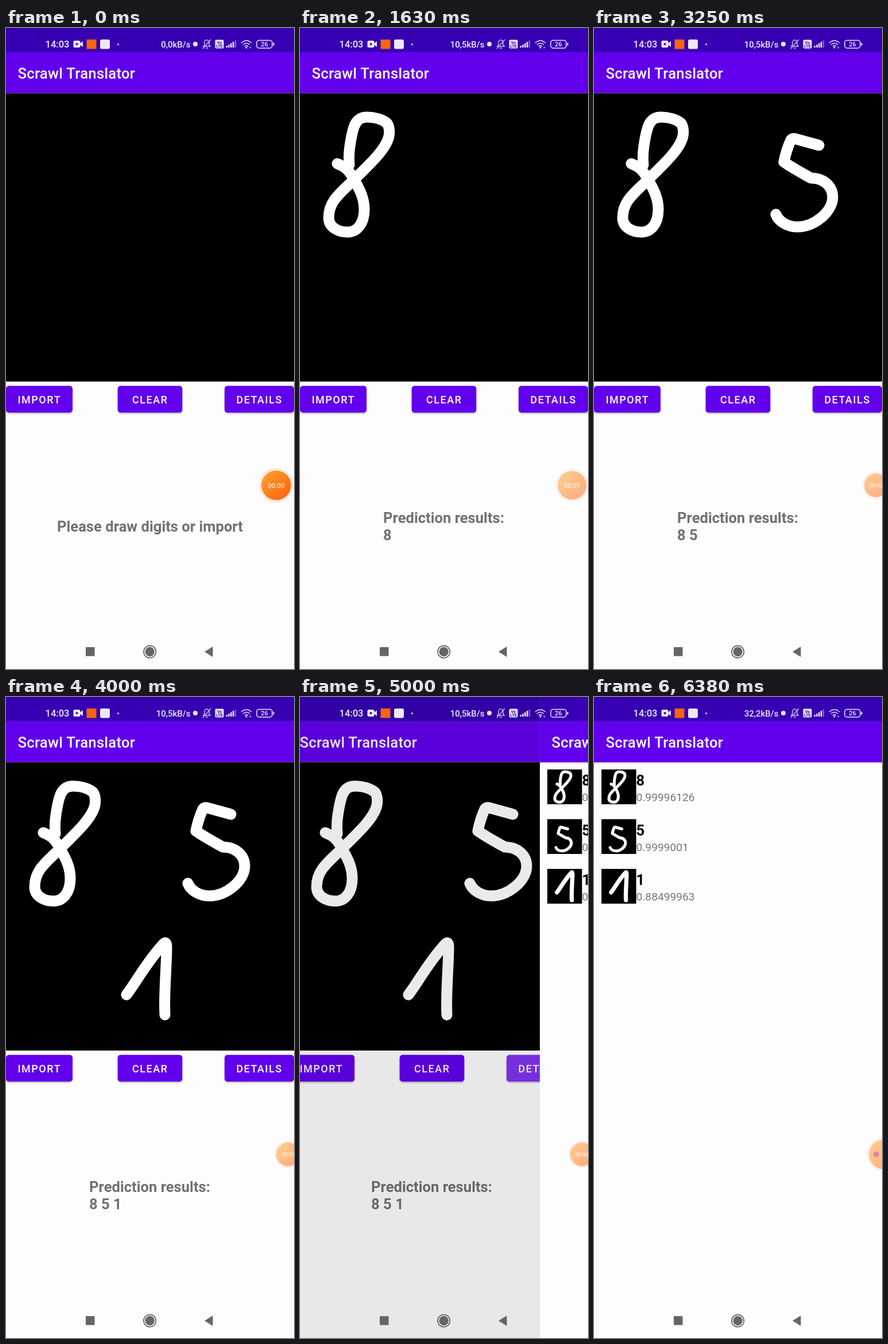
Recreate the animation shown at these times as an HTML page. Size 502 by 1115 pixels, loop 6870 ms.

```html
<!DOCTYPE html>
<html lang="en">
<head>
<meta charset="utf-8">
<title>Scrawl Translator</title>
<style>
  html, body { margin: 0; height: 100%; overflow: hidden; background: #fefdfe; }
  svg { display: block; width: 100vw; height: 100vh; font-family: Roboto, sans-serif; }
  .title { font-size: 25.6px; font-weight: 500; letter-spacing: .32px; fill: #fff; }
  .button { fill: #6200ee; filter: drop-shadow(0 2px 1.5px #0004); }
  .label { font-size: 17.9px; font-weight: 500; letter-spacing: 1.6px; fill: #fff; }
  .message { font-size: 25.6px; font-weight: 700; fill: #727172; }
  .digit { font-size: 25.6px; font-weight: 700; }
  .score { font-size: 19.2px; fill: #777; }
  .ink { fill: none; stroke: #fff; stroke-width: 19; stroke-linecap: round; stroke-linejoin: round; }
  .status { fill: #eee8fa; font-weight: 500; }
  .line { fill: none; stroke: #eee8fa; stroke-width: 1.5; }
</style>
</head>
<body>
<svg viewBox="0 0 502 1115">
  <defs>
    <path id="eight" pathLength="1" d="M65 236C73 240 82 240 95 265C106 284 112 298 112 316C112 342 98 355 83 355C67 355 50 347 50 330C50 300 72 286 95 263C118 240 150 212 155 188C157 176 154 168 151 165C142 158 128 155 117 155C96 155 92 172 87 205C85 218 85 228 86 238"/>
    <path id="five" pathLength="1" d="M392 204L352 193Q346 191 343 195C339 204 334 218 331 233C345 243 362 252 378 261C400 261 416 275 416 294C416 320 384 346 354 346C338 346 322 337 317 324"/>
    <path id="one" pathLength="1" d="M210 518C228 494 246 460 274 430Q280 424 280 434C280 470 275 515 277 553"/>
    <g id="bars">
      <rect width="502" height="42" fill="#3700b3"/>
      <rect y="42" width="502" height="71.5" fill="#6200ee"/>
      <text class="title" x="20.4" y="88">Scrawl Translator</text>
    </g>
    <linearGradient id="orange" x2="1" y2="1">
      <stop offset=".1" stop-color="#ff9d28"/>
      <stop offset=".9" stop-color="#ff650f"/>
    </linearGradient>
    <linearGradient id="shade" x2="0" y2="1">
      <stop stop-color="#000" stop-opacity=".2"/>
      <stop offset="1" stop-opacity="0"/>
    </linearGradient>
    <clipPath id="detailsClip"><rect x="381" y="622.5" width="121" height="46.5" rx="5"/></clipPath>
  </defs>

  <g id="drawPage">
    <rect width="502" height="1115" fill="#fefdfe"/>
    <use href="#bars"/>
    <rect y="113.5" width="502" height="501.5"/>
    <g class="ink" id="ink">
      <use href="#eight"/><use href="#five"/><use href="#one"/>
    </g>
    <rect class="button" y="622.5" width="116" height="46.5" rx="5"/>
    <rect class="button" x="194.7" y="622.5" width="112.6" height="46.5" rx="5"/>
    <rect class="button" id="details" x="381" y="622.5" width="121" height="46.5" rx="5"/>
    <circle id="ripple" cx="455" cy="647" fill="#fff" opacity=".2" clip-path="url(#detailsClip)"/>
    <text class="label" x="20.4" y="653">IMPORT</text>
    <text class="label" x="220" y="653">CLEAR</text>
    <text class="label" x="401.5" y="653">DETAILS</text>
    <text class="message" id="prompt" x="251" y="876" text-anchor="middle">Please draw digits or import</text>
    <g class="message" id="results">
      <text x="145" y="861">Prediction results:</text>
      <text id="found" x="145" y="890.5"></text>
    </g>
  </g>
  <rect id="dim" width="502" height="1115"/>

  <g id="listPage">
    <rect width="502" height="1115" fill="#fefdfe"/>
    <rect y="113" width="502" height="4" fill="url(#shade)"/>
    <use href="#bars"/>
    <g id="rows"></g>
  </g>

  <g class="status">
    <text x="68.5" y="34" font-size="16.5">14:03</text>
    <rect x="117.5" y="22" width="12" height="12" rx="2.5"/>
    <path d="M129 27l5-4v10l-5-4z"/>
    <circle cx="123.5" cy="28" r="2" fill="#3700b3"/>
    <rect x="140.5" y="20" width="17" height="16.5" fill="#f7640a"/>
    <rect x="164" y="20" width="17" height="16.5" rx="3"/>
    <circle cx="195.5" cy="28.5" r="1.5"/>
    <text id="speed" x="321.5" y="33.5" font-size="15" text-anchor="end"></text>
    <circle cx="330" cy="28" r="4"/>
    <g class="line" opacity=".8">
      <path d="M344 32h12l-2-3v-4a4 4 0 0 0-8 0v4zM348 35h4M343 36l14-16"/>
    </g>
    <rect x="364.5" y="20.5" width="15" height="15" rx="2"/>
    <g fill="#3700b3" font-size="7" font-weight="700" text-anchor="middle">
      <text x="372" y="27.5">Vo</text><text x="372" y="34.3">LTE</text>
    </g>
    <path d="M383.5 34v-3h2.5v3zM387.3 34v-5h2.5v5zM391.1 34v-7.500h2.500v7.500zM394.900 34v-10h2.500v10z"/>
    <path d="M398.700 34v-12.500h2.500v12.500z" opacity=".4"/>
    <path class="line" stroke-width="2" d="M410 26q9-8 18 0M413 29q6-5 12 0M416 32q3-2.500 6 0"/>
    <circle cx="419" cy="34" r="1.500"/>
    <path d="M425 32l2 2-2 2z"/>
    <rect class="line" x="437" y="21.500" width="27" height="13.500" rx="4"/>
    <path d="M465.500 26h2v4.500h-2z"/>
    <text x="450.500" y="32.300" font-size="11" text-anchor="middle">26</text>
  </g>

  <g fill="#666466">
    <rect x="139" y="1077" width="15.500" height="15.500"/>
    <circle cx="250.700" cy="1085" r="8.200"/>
    <circle cx="250.700" cy="1085" r="10.700" fill="none" stroke="#666466" stroke-width="1.700"/>
    <path d="M346 1085l14.500-9v18z"/>
  </g>

  <g id="bubble">
    <circle r="30" fill="#f4e4de" opacity=".85"/>
    <circle r="25.800" fill="url(#orange)"/>
    <text id="timer" y="4.200" font-size="11.600" fill="#fff" text-anchor="middle"></text>
    <circle id="dot" cx="-13" r="5" fill="#c01a50"/>
  </g>
</svg>
<script>
const LOOP = 6870, LAST = 51, STEP = 125;
const el = id => document.getElementById(id);
const set = (node, attrs) => { for (const k in attrs) node.setAttribute(k, attrs[k]); };
const show = (node, on) => set(node, { visibility: on ? 'visible' : 'hidden' });
const ramp = (t, a, b) => Math.min(1, Math.max(0, (t - a) / (b - a)));
const ease = u => u * u * (3 - 2 * u);

const rows = [
  ['eight', '8', '0.99996126', 'translate(40 156.500) scale(.265) translate(-103 -255)'],
  ['five', '5', '0.9999001', 'translate(41.500 247) scale(.27) translate(-366.500 -269)'],
  ['one', '1', '0.88499963', 'translate(43.500 329) scale(.385) translate(-245.500 -490)']
];
el('rows').innerHTML = rows.map(([id, digit, score, place], i) => {
  const y = 126 + i * 86.5;
  return `<rect x="13" y="${y}" width="60.5" height="60.5"/>
    <g style="filter:blur(.6px)"><use class="ink" href="#${id}" transform="${place}"/></g>
    <text class="digit" x="73.5" y="${y + 28}">${digit}</text>
    <text class="score" x="73.5" y="${y + 55}">${score}</text>`;
}).join('');

// Start and end of each pen stroke
const strokes = [[200, 1000], [1850, 2500], [3350, 3850]];

function draw(t) {
  [...el('ink').children].forEach((stroke, i) => {
    const u = ramp(t, ...strokes[i]);
    show(stroke, u > 0);
    set(stroke, { 'stroke-dasharray': `${u * 1.01} 2` });
  });

  show(el('prompt'), t < 1125);
  show(el('results'), t >= 1125);
  el('found').textContent = t < 2625 ? '8' : t < 4000 ? '8 5' : '8 5 1';
  el('speed').textContent = t < 1125 ? '0,0kB/s' : t < 5125 ? '10,5kB/s' : '32,2kB/s';

  set(el('ripple'), { r: Math.max(0, (t - 4730) * .3) });
  el('details').style.filter = t >= 4750 && t < 5000 ? 'drop-shadow(0 5px 4px #0005)' : '';

  // Page change: the list slides over the slower, darkening drawing page
  let p = 1 / (1 + Math.exp((5039.5 - t) / 24.6));
  if (p < .002) p = 0;
  if (p > .999) p = 1;
  set(el('drawPage'), { transform: `translate(${-125.5 * p})` });
  set(el('dim'), { opacity: p / 2 });
  set(el('listPage'), { transform: `translate(${502 * (1 - p)})` });

  const slide = ease(ramp(t, 1540, 1875)), dock = ramp(t, 5510, 5625);
  const x = 471 + 20.5 * slide + 13.5 * dock;
  const size = 1 - .2 * slide + .2 * dock;
  set(el('bubble'), {
    transform: `translate(${x} 795.5) scale(${size})`,
    opacity: 1 - .48 * ramp(t, 850, 1125)
  });
  const sec = Math.max(t >= 1125 ? 1 : 0, Math.floor((t - 250) / 1000));
  el('timer').textContent = '00:0' + sec;
  show(el('timer'), dock < 1);
  show(el('dot'), t >= 5875);
}

function tick(now) {
  const t = now % LOOP;
  let k = Math.floor(t / STEP);
  if (t < Math.ceil(k * 12.5) * 10) k--;
  draw(Math.min(k, LAST) * STEP);
  requestAnimationFrame(tick);
}
draw(0);
requestAnimationFrame(tick);
</script>
</body>
</html>
```
